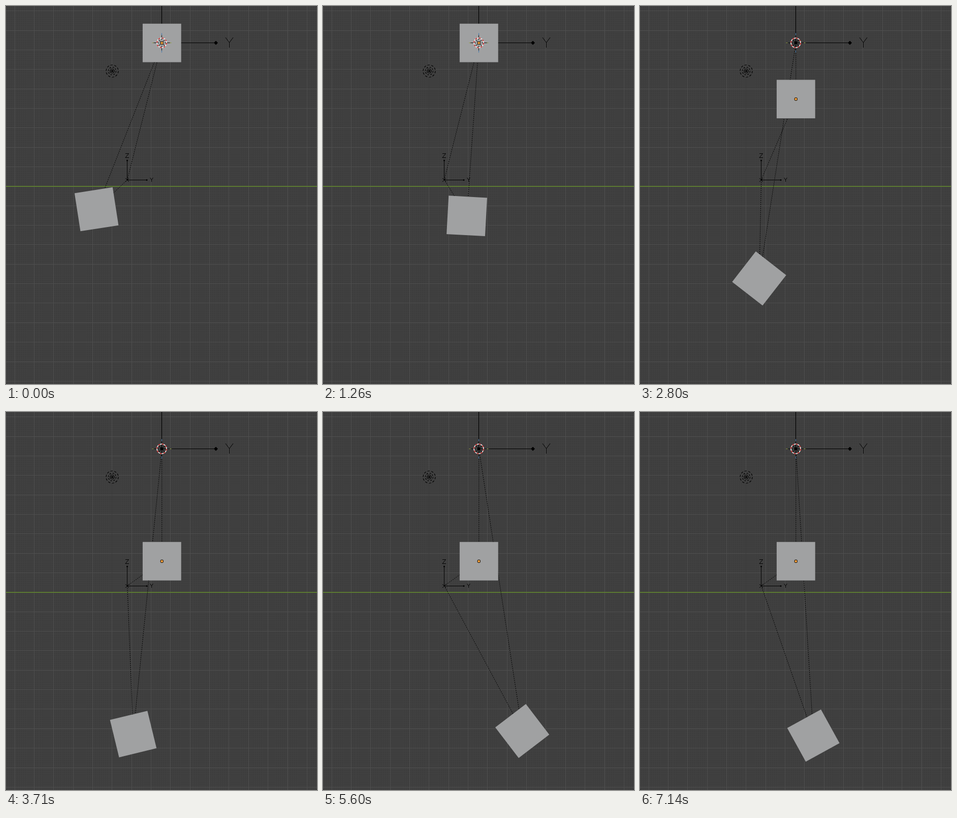
Animation, 612 px wide and 744 px high, one loop 7.21 s. Source, as an HTML page with a canvas:

```html
<!DOCTYPE html>
<html lang="en">
<head>
<meta charset="utf-8">
<title>Pendulum in a 3D viewport</title>
<style>
  html, body { margin: 0; width: 612px; height: 744px; overflow: hidden; background: #2a2a2a; }
  canvas { display: block; border-radius: 3px; }
</style>
</head>
<body>
<canvas id="stage" width="612" height="744"></canvas>
<script>
const W = 612, H = 744, LOOP = 7210, STEP = 70;
const ctx = document.getElementById('stage').getContext('2d');
const ORIGIN = [306.8, 72.7], EMPTY = [238.7, 342];
const DROP = 221, DROP_START = 2220, DROP_TIME = 1160;
const SNAP = 3325; // the hinge jumps from the low pivot to the upper cube
const DEG = Math.PI / 180;

// Bezier ease with flat handles
function ease(x) {
  if (x <= 0) return 0;
  if (x >= 1) return 1;
  let lo = 0, hi = 1;
  for (let i = 0; i < 30; i++) {
    const s = (lo + hi) / 2, r = 1 - s;
    if (1.17 * s * r * r + 1.83 * s * s * r + s * s * s < x) lo = s; else hi = s;
  }
  return lo * lo * (3 - 2 * lo);
}

const fallAt = t => DROP * ease((t - DROP_START) / DROP_TIME);

// Short pendulum on a falling hinge, integrated once: one angle per step
const shortSwing = (() => {
  const dt = 5, s = dt / 1000, rate = 3.5, reach = 95.5, drag = 0.08;
  const angles = [];
  let angle = -46.2 * DEG, speed = 0.18;
  for (let t = 0; t < SNAP; t += dt) {
    if (t % STEP === 0) angles.push(angle);
    const fallAccel = (fallAt(t + dt) - 2 * fallAt(t) + fallAt(t - dt)) / (s * s);
    speed += s * ((fallAccel / reach - rate) * Math.sin(angle) - drag * speed);
    angle += s * speed;
  }
  return angles;
})();

// Long pendulum: damped swing around its turning point
function longSwing(t) {
  const s = (t - 5950) / 1000;
  return 15.05 * DEG * Math.exp(-0.03 * s) * Math.cos(0.98 * s);
}

function line(color, width, ...pts) {
  ctx.strokeStyle = color;
  ctx.lineWidth = width;
  ctx.beginPath();
  for (let i = 0; i < pts.length; i += 2) ctx.lineTo(pts[i], pts[i + 1]);
  ctx.stroke();
}

function ring(x, y, r, color, width, dash = []) {
  ctx.strokeStyle = color;
  ctx.lineWidth = width;
  ctx.setLineDash(dash);
  ctx.beginPath();
  ctx.arc(x, y, r, 0, 2 * Math.PI);
  ctx.stroke();
  ctx.setLineDash([]);
}

function dot(x, y, r, color) {
  ctx.fillStyle = color;
  ctx.beginPath();
  ctx.arc(x, y, r, 0, 2 * Math.PI);
  ctx.fill();
}

function dotted(a, b) {
  ctx.setLineDash([2, 2]);
  line('#000', 1, ...a, ...b);
  ctx.setLineDash([]);
}

function cross(x, y, r) {
  line('#000', 1, x - r, y - r, x + r, y + r);
  line('#000', 1, x - r, y + r, x + r, y - r);
}

function letterY(x, y, w, h) {
  line('#000', 1, x - w, y - h, x, y, x + w, y - h);
  line('#000', 1, x, y, x, y + h);
}

function grid(gap, x0, y0, color) {
  ctx.fillStyle = color;
  for (let x = x0; x < W; x += gap) ctx.fillRect(Math.round(x), 0, 1, H);
  for (let y = y0; y < H; y += gap) ctx.fillRect(0, Math.round(y), W, 1);
}

function viewport() {
  ctx.fillStyle = '#3d3d3d';
  ctx.fillRect(0, 0, W, H);
  grid(3.835, 1.2, 1.2, '#414141');
  grid(38.35, 16.6, 9.2, '#4f4f4f');
  ctx.fillStyle = '#5c7a32';
  ctx.fillRect(0, 354, W, 2);
}

function light(x, y) {
  line('rgba(0, 0, 0, 0.2)', 1, x - 0.5, y + 12, x - 0.5, 354);
  dot(x, y, 2, '#000');
  ring(x, y, 4, '#000', 1.2);
  ring(x, y, 7.5, '#000', 1.2, [3.4, 2.5]);
  ring(x, y, 12, '#000', 1.2, [4.4, 3.14]);
}

function empties() {
  line('#000', 1.2, 306.5, 0, 306.5, 72.5, 413, 72.5);
  ctx.fillStyle = '#000';
  ctx.beginPath();
  for (const [x, y] of [[409, 72.5], [413, 68.5], [417, 72.5], [413, 76.5]]) ctx.lineTo(x, y);
  ctx.fill();
  letterY(439.5, 72, 7.5, 10);

  line('#000', 1, 238.5, 304, 238.5, 342.5, 277, 342.5);
  dot(238.5, 304, 1.5, '#000');
  dot(277, 342.5, 1.5, '#000');
  line('#000', 1, 235, 290.5, 241.5, 290.5, 235, 298.5, 242, 298.5);
  letterY(286.5, 342, 3, 4);
  cross(238.5, 342.5, 3.5);
}

function cube(x, y, angle) {
  ctx.save();
  ctx.translate(x, y);
  ctx.rotate(angle);
  ctx.fillStyle = '#a0a1a2';
  ctx.fillRect(-37.9, -37.9, 75.8, 75.8);
  ctx.restore();
}

function cursor(x, y) {
  for (const s of [-1, 1]) {
    line('#111', 1, x + s * 6, y, x + s * 17, y);
    line('#8c9a3c', 1, x + s * 16, y, x + s * 19, y);
    line('#111', 1, x, y + s * 6, x, y + s * 16);
    line('#3f78b0', 1, x, y + s * 15, x, y + s * 19);
  }
  const r = 9.5, dash = Math.PI * r / 8;
  ring(x, y, r, '#fff', 1.6);
  ring(x, y, r, '#d02020', 1.6, [dash, dash]);
  cross(x, y, 6);
}

function draw(t) {
  const fall = fallAt(t);
  const top = [ORIGIN[0], ORIGIN[1] + fall];
  const short = t < SNAP;
  const swing = short ? shortSwing[t / STEP] : longSwing(t);
  const pivot = short ? [EMPTY[0], EMPTY[1] + fall] : top;
  const arm = short ? 83.9 : 344.9;
  const bob = [pivot[0] + arm * Math.sin(swing), pivot[1] + arm * Math.cos(swing)];
  const restTurn = (short ? -55 : -23.1) * DEG;

  viewport();
  light(209, 128);
  empties();
  for (const anchor of [ORIGIN, EMPTY]) {
    dotted(anchor, top);
    dotted(anchor, bob);
  }
  cube(...bob, restTurn - swing);
  cube(...top, 0);
  cursor(306.5, 72.5);
  if (fall > 8) dot(306.5, 72.5, 3, '#000');
  dot(...top, 3.2, '#1a1208');
  dot(...top, 2.3, '#f6a13c');
}

const start = performance.now();
function tick() {
  const t = (performance.now() - start) % LOOP;
  draw(Math.floor(t / STEP) * STEP);
  requestAnimationFrame(tick);
}
tick();
</script>
</body>
</html>
```
